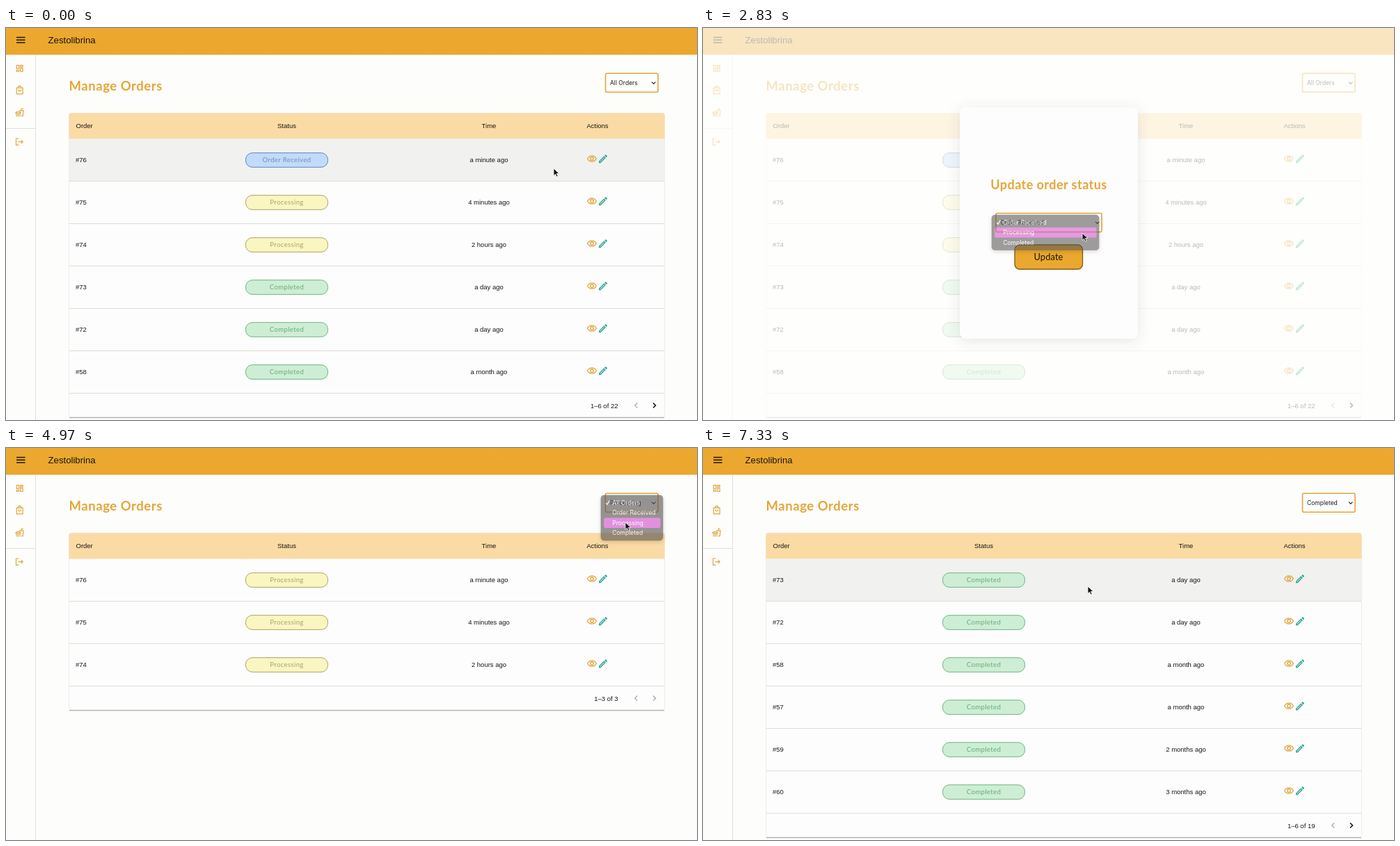
These frames come from a looping animation (993 by 564 pixels, 7.36 s). An HTML page:

```html
<!DOCTYPE html>
<html lang="en">
<head>
<meta charset="utf-8">
<title>Manage Orders</title>
<style>
html, body { margin: 0; width: 100%; height: 100%; overflow: hidden; background: #fdfdfc; }
svg { position: absolute; left: 0; top: 0; display: block; }
text { white-space: pre; }
.sans { font-family: "Liberation Sans", Arial, sans-serif; font-size: 9.5px; fill: #161616; }
.ui { font-family: Inter, sans-serif; font-size: 8.5px; }
.round { font-family: Lato, sans-serif; font-size: 10.7px; letter-spacing: .15px; fill: #2b2b2b; }
.chip { font-family: Lato, sans-serif; font-size: 9.6px; letter-spacing: .35px; }
.bold { font-weight: 700; fill: #111; }
.title { font-family: Lato, sans-serif; font-weight: 700; fill: #e5a638; }
</style>
</head>
<body>
<svg id="stage" width="993" height="564" viewBox="0 0 993 564">
  <defs>
    <linearGradient id="bar" x1="0" y1="0" x2="0" y2="1">
      <stop offset="0" stop-color="#eda92f"/><stop offset="1" stop-color="#eaa62d"/>
    </linearGradient>
    <filter id="soft" x="-20%" y="-20%" width="140%" height="140%">
      <feDropShadow dx="0" dy="3" stdDeviation="9" flood-color="#555566" flood-opacity=".14"/>
    </filter>
    <filter id="lift" x="-20%" y="-30%" width="140%" height="170%">
      <feDropShadow dx="0" dy="2" stdDeviation="3" flood-color="#000" flood-opacity=".25"/>
    </filter>
    <g id="eye" transform="translate(842 188) scale(.64) translate(-12 -11.5)" fill="none" stroke="#e3a53b" stroke-width="2">
      <path d="M2.1 11.5C4 7.5 7.6 5 12 5s8 2.5 9.9 6.5C20 15.500 16.400 18 12 18s-8-2.500-9.900-6.500z"/>
      <circle cx="12" cy="11.500" r="3.500"/>
    </g>
    <path id="pen" transform="translate(858 188.200) scale(.667) translate(-12 -12)" fill="#22a68c" d="M14.06 9.02l.92.92L5.920 19H5v-.92l9.060-9.060M17.660 3c-.25 0-.51.1-.7.290l-1.830 1.830 3.750 3.750 1.830-1.830c.39-.39.39-1.020 0-1.410l-2.340-2.340c-.2-.2-.45-.29-.71-.29zm-3.600 3.190L3 17.250V21h3.750L17.810 9.940z"/>
    <path id="arrow" d="M0 0v10.500l2.500-2.300 1.700 3.900 1.900-.8-1.700-3.800h3.500z" fill="#111" stroke="#fff" stroke-width=".8"/>
    <path id="hand" d="M1.500 6.500V.8C1.500-.4 3.300-.4 3.300.8v3.700c.5-.5 1.500-.4 1.800.3.600-.4 1.500-.2 1.700.5.800-.3 1.600.2 1.600 1v2.300c0 1.500-.8 2-1 3.200H2.700C2.400 10.200.2 8.500-.8 6.900-1.300 6-.2 5.300.5 5.800z" fill="#fff" stroke="#111" stroke-width=".9"/>
  </defs>
  <g id="page"></g>
  <use id="cursor" href="#arrow"/>
</svg>
<script>
const LOOP = 7360, ORANGE = "#e3a53b";
const page = document.getElementById("page");
const cursor = document.getElementById("cursor");

// time, x, y of the pointer tip
const PATH = [
  [0, 787, 202], [250, 841, 188], [400, 841, 187], [470, 840, 185], [820, 842, 190],
  [1120, 922, 236], [1200, 922, 236], [1500, 864, 191], [1720, 864, 191],
  [2150, 545, 281], [2380, 545, 281], [2620, 545, 295], [2860, 545, 295],
  [3130, 508, 329], [3450, 508, 329], [3730, 640, 225], [3800, 640, 225],
  [4170, 881, 81], [4380, 881, 81], [4720, 890, 107], [4960, 890, 107],
  [5300, 889, 79], [5640, 889, 80], [5770, 890, 85], [5980, 890, 93],
  [6230, 890, 93], [7000, 570, 194], [7330, 553, 199]
];

const LISTS = {
  "All Orders": { count: "1–6 of 22", rows: [[76, "Order Received", "a minute ago"], [75, "Processing", "4 minutes ago"],
    [74, "Processing", "2 hours ago"], [73, "Completed", "a day ago"], [72, "Completed", "a day ago"], [58, "Completed", "a month ago"]] },
  "Processing": { count: "1–3 of 3", rows: [[76, "Processing", "a minute ago"], [75, "Processing", "4 minutes ago"],
    [74, "Processing", "2 hours ago"]] },
  "Completed": { count: "1–6 of 19", rows: [[73, "Completed", "a day ago"], [72, "Completed", "a day ago"], [58, "Completed", "a month ago"],
    [57, "Completed", "a month ago"], [59, "Completed", "2 months ago"], [60, "Completed", "3 months ago"]] }
};
const CHIPS = { // fill, border, text
  "Order Received": ["#c3daf9", "#5c86c2", "#6a93c6"],
  "Processing": ["#faf6c1", "#aaa263", "#a9a46c"],
  "Completed": ["#cdeed4", "#6fb381", "#68aa7b"]
};
const STATUSES = Object.keys(CHIPS);
const FILTERS = ["All Orders", ...STATUSES];

// start, end of opening, options, chosen option, left, top, width
const MENUS = [
  [2270, 2750, STATUSES, 0, 415, 269, 154],
  [4300, 4900, FILTERS, 0, 855, 68, 89],
  [5430, 6150, FILTERS, 2, 855, 39, 89]
];
const FADE = 190, ITEM = 14.5;

const within = (t, a, b) => t >= a && t < b;
const text = (x, y, s, cls, anchor = "start", extra = "") =>
  `<text x="${x}" y="${y}" class="${cls}" text-anchor="${anchor}" ${extra}>${s}</text>`;
const rect = (x, y, w, h, fill, extra = "") =>
  `<rect x="${x}" y="${y}" width="${w}" height="${h}" fill="${fill}" ${extra}/>`;
const stroke = (d, color, width = 1) =>
  `<path d="${d}" fill="none" stroke="${color}" stroke-width="${width}"/>`;

function pointer(t) {
  let i = PATH.findIndex(p => p[0] > t);
  if (i < 0) return PATH[PATH.length - 1].slice(1);
  const [t0, x0, y0] = PATH[i - 1], [t1, x1, y1] = PATH[i];
  const u = (t - t0) / (t1 - t0), e = u * u * (3 - 2 * u);
  return [x0 + (x1 - x0) * e, y0 + (y1 - y0) * e];
}

function sidebar() {
  return rect(0, 0, 993, 38.500, "url(#bar)") +
    stroke("M15 13.500h12.500M15 17.300h12.500M15 21h12.500", "#1c1708", 1.400) +
    text(60.500, 22, "Zestolibrina", "sans", "start", 'style="font-size:13.2px"') +
    stroke("M42.500 38.500V564M0 144.500H42", "#dedede") +
    stroke("M15.200 53.600h3.400v4.800h-3.400zM20.700 53.600h3.400v2.600h-3.400zM15.200 60.500h3.400v2h-3.400zM20.700 58.200h3.400v4.300h-3.400z" +
      "M15.200 86.200h8.900v8.700h-8.900zM17.500 86v-.5a2.100 2.100 0 0 1 4.200 0v.5M17.500 88.500a2.100 2.100 0 0 0 4.200 0" +
      "M14 122.600c0-3 7-3 7 0zM14 124.500h7M14 126.500h7M19 118.800h6l-.8 7.900h-2.200M22 118.500l.5-2.300 1.800-.5" +
      "M18.500 159h-4v9.300h4M17.500 163.700h6.500M21.700 161.200l2.500 2.500-2.500 2.500", ORANGE, 1.200);
}

function selectBox(x, y, w, h, label) {
  return rect(x, y, w, h, "#fefefe", `rx="2" stroke="${ORANGE}" stroke-width="1.6"`) +
    text(x + 6.500, y + h / 2 + 3, label, "ui", "start", 'fill="#1c1c1c"') +
    stroke(`M${x + w - 9} ${y + h / 2 - 1.200}l2.700 2.700 2.700-2.700`, "#222", 1.200);
}

function row([id, status, time], i, hover) {
  const top = 159.500 + i * 61, mid = top + 30.300;
  const [fill, edge, ink] = CHIPS[status];
  return (hover ? rect(90.500, top, 856, 61, "#f1f1ef") : "") +
    stroke(`M90.500 ${top + 61}H946`, "#dcdcd8") +
    text(100, mid + 3.500, "#" + id, "sans") +
    rect(344.500, top + 20.200, 118, 20.600, fill, `rx="9.500" stroke="${edge}"`) +
    text(403.500, mid + 3.500, status, "chip", "middle", `fill="${ink}"`) +
    text(694, mid + 3.500, time, "sans", "middle") +
    `<g transform="translate(0 ${i * 61})"><use href="#eye"/><use href="#pen"/></g>`;
}

function table(s) {
  const { rows, count } = LISTS[s.filter];
  const end = 159.500 + rows.length * 61, mid = end + 17.500;
  const next = rows.length > 3 ? "#111" : "#aaa";
  const shown = rows.map(r => s.updated && r[0] === 76 ? [76, "Processing", r[2]] : r);
  return text(90.500, 90, "Manage Orders", "title", "start", 'style="font-size:18.5px;letter-spacing:.55px"') +
    selectBox(861.500, 65.300, 75.500, 27, s.filter) +
    rect(90.500, 122.500, 856, end + 35 - 122.500, "#fdfdfd", 'rx="3" stroke="#ededea"') +
    stroke(`M91 ${end + 35}H946`, "#b5b5b3", 1.300) +
    `<path d="M90.500 159.500V125.500a3 3 0 0 1 3-3h850a3 3 0 0 1 3 3v34z" fill="#fbdba4"/>` +
    text(100.500, 144.300, "Order", "sans") + text(403.500, 144.300, "Status", "sans", "middle") +
    text(694, 144.300, "Time", "sans", "middle") + text(850, 144.300, "Actions", "sans", "middle") +
    shown.map((r, i) => row(r, i, i === s.hover)).join("") +
    text(879.500, mid + 3.500, count, "sans", "end") +
    stroke(`M907.200 ${mid - 3.500}l-3.500 3.500 3.500 3.500`, "#aaa", 1.300) +
    stroke(`M930 ${mid - 3.500}l3.500 3.500-3.500 3.500`, next, 1.500);
}

function dialog(x, y, w, h) {
  return rect(0, 0, 993, 564, "#fffffc", 'opacity=".7"') +
    rect(x, y, w, h, "#fdfdfe", 'rx="9" filter="url(#soft)"');
}

function orderDialog() {
  const line = (y, cells, cls) => [133, 401, 579.500, 847.500].map((x, i) =>
    text(x, y, cells[i], cls, ["start", "middle", "middle", "end"][i])).join("");
  return dialog(100, 54, 794, 453) +
    text(133, 108, "Order : #76", "title", "start", 'style="font-size:19.5px;letter-spacing:.2px"') +
    text(133, 126.500, "Payment: COD", "round") +
    text(847.500, 104.500, "Order Date: 17 June 2023", "round", "end") +
    text(847.500, 120.500, "Status: Order Received", "round", "end") +
    line(172, ["Product", "Quantity", "Price($)", "Total Price($)"], "round bold") +
    line(208, ["Dumpling", 3, 2, 6], "round") +
    line(244, ["Chicken Soup Dumpling", 4, 2.1, 8.4], "round") +
    stroke("M133 186H861M133 222H861M133 258H861", "#e2e2dc") +
    text(847.500, 306, "Total: $14.4", "round bold", "end", 'style="font-size:18.5px"');
}

function statusDialog(status) {
  return dialog(369, 114, 256, 333) +
    text(497, 232, "Update order status", "title", "middle", 'style="font-size:18px;letter-spacing:.45px"') +
    selectBox(421, 266.500, 152, 27, status) +
    rect(448, 312, 97.500, 35, "#eba82f", 'rx="7" stroke="#7b5b17" stroke-width="1.3"') +
    text(496.500, 334, "Update", "round", "middle", 'style="font-size:12.8px;fill:#18140a"');
}

function menu({ items, chosen, x, y, w, over, alpha }) {
  return `<g opacity="${alpha}">` +
    rect(x, y, w, items.length * ITEM + 7, "#585553", 'rx="4.500" stroke="#4a4745" stroke-width=".6" filter="url(#lift)"') +
    rect(x + 4, y + 3.500 + over * ITEM, w - 7.500, ITEM, "#d350cd", 'rx="2.500"') +
    items.map((label, i) => text(x + 16.300, y + 13.700 + i * ITEM, label, "ui", "start", 'fill="#fff"')).join("") +
    stroke(`M${x + 7} ${y + 11 + chosen * ITEM}l1.800 2.300 3.500-5.500`, "#fff", 1.200) + "</g>";
}

function stateAt(t, y) {
  const modal = within(t, 380, 1200) ? "order" : within(t, 1720, 3400) ? "status" : "";
  const m = MENUS.find(m => within(t, m[0], m[1] + FADE));
  const open = m && {
    items: m[2], chosen: m[3], x: m[4], y: m[5], w: m[6],
    over: Math.max(0, Math.min(m[2].length - 1, Math.floor((y - m[5] - 3.500) / ITEM))),
    alpha: t < m[1] ? 1 : 1 - (t - m[1]) / FADE
  };
  const filter = t < 4930 ? "All Orders" : t < 6190 ? "Processing" : "Completed";
  const at = Math.floor((y - 159.500) / 61);
  return {
    modal, open, filter, updated: t >= 3400, status: t < 2860 ? "Order Received" : "Processing",
    hover: modal || open ? -1 : at
  };
}

let last = "";
function draw(t) {
  const [x, y] = pointer(t);
  const s = stateAt(t, y), key = JSON.stringify(s);
  if (key !== last) {
    last = key;
    page.innerHTML = rect(0, 0, 993, 564, "#fdfdfc") + table(s) + sidebar() +
      (s.modal === "order" ? orderDialog() : s.modal === "status" ? statusDialog(s.status) : "") +
      (s.open ? menu(s.open) : "");
  }
  const onIcon = !s.modal && !s.open && s.hover >= 0 && x > 834 && x < 866 && Math.abs(y - 188) < 8;
  const onButton = s.modal === "status" && !s.open && x > 448 && x < 546 && y > 312 && y < 347;
  cursor.setAttribute("href", onIcon || onButton ? "#hand" : "#arrow");
  cursor.setAttribute("transform", `translate(${x.toFixed(2)} ${y.toFixed(2)})`);
}

const start = performance.now();
function tick() {
  draw((performance.now() - start) % LOOP);
  requestAnimationFrame(tick);
}
tick();
</script>
</body>
</html>
```
